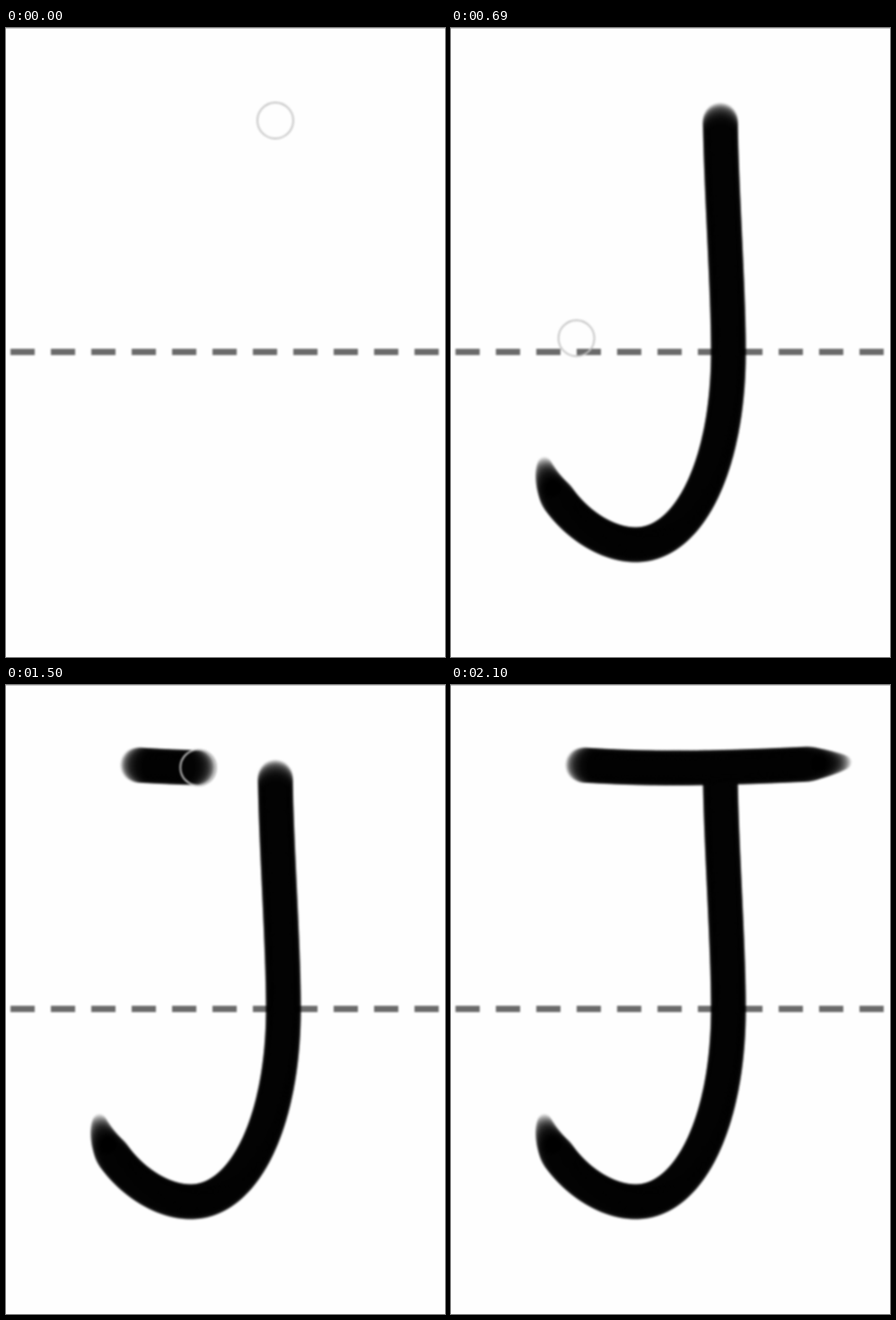
Animation, 489 px wide and 700 px high, one loop 7770 ms. Source, as an HTML page with a canvas:

```html
<!DOCTYPE html>
<html lang="en">
<head>
<meta charset="utf-8">
<title>Writing the letter J</title>
<style>
  html, body { margin: 0; width: 100%; height: 100%; overflow: hidden; background: #fefefe; }
  canvas { display: block; filter: blur(0.8px); }
  body::before { content: ""; position: absolute; z-index: 1; width: 100%; height: 1px; background: #ccc; }
</style>
</head>
<body>
<canvas id="stage" width="489" height="700"></canvas>
<script>
const ctx = document.getElementById('stage').getContext('2d');
const LOOP = 7770, TICK = 30, HIDE = 2100;
const RADIUS = 19.7, TAIL = 42, FLOW = 0.16;

const clamp = u => Math.max(0, Math.min(1, u));

function bezier([a, b, c, d], u) {
  const v = 1 - u;
  return [0, 1].map(k =>
    v * v * v * a[k] + 3 * v * v * u * b[k] + 3 * v * u * u * c[k] + u * u * u * d[k]);
}

// Sample chained cubic curves at one-pixel spacing.
function trace(pts) {
  const out = [pts[0]];
  let last = pts[0], travelled = 0;
  for (let i = 0; i + 3 < pts.length; i += 3) {
    for (let k = 1; k <= 600; k++) {
      const p = bezier(pts.slice(i, i + 4), k / 600);
      travelled += Math.hypot(p[0] - last[0], p[1] - last[1]);
      last = p;
      if (travelled >= out.length) out.push(p);
    }
  }
  return out;
}

// Strokes leave ink and gather speed; the other moves only carry the cursor.
const stroke = (from, to, power, pts) => {
  const path = trace(pts);
  const count = t => Math.round(path.length * clamp((t - from) / (to - from)) ** power);
  return { from, to, path, count, at: t => path[Math.max(0, count(t) - 1)] };
};
const travel = (from, to, pts) =>
  ({ from, to, at: t => bezier(pts, clamp((t - from) / (to - from))) });

const stem = stroke(0, 550, 1.65, [
  [300, 103], [301, 180], [309, 290],
  [309, 360], [309, 485], [266, 575],
  [206, 575], [156, 575], [106, 522], [104, 484]
]);
const hover = travel(550, 1320, [[104, 484], [140, 198], [379, 90], [145, 91]]);
const bar = stroke(1380, 1630, 2, [[147, 89], [240, 95], [320, 92], [439, 86]]);
const leave = travel(1630, HIDE, [[439, 86], [480, 84], [490, 60], [512, 60]]);
const moves = [stem, hover, bar, leave];

function disc([x, y], r, alpha) {
  ctx.fillStyle = `rgba(0,0,0,${alpha})`;
  ctx.beginPath();
  ctx.arc(x, y, r, 0, 2 * Math.PI);
  ctx.fill();
}

// Translucent dabs build up to a solid stroke with a tapering tail.
function ink({ path, count }, t) {
  for (let i = 0, n = count(t); i < n; i++) {
    const p = clamp((path.length - i) / TAIL);
    disc(path[i], RADIUS * (0.35 + 0.65 * p ** 0.75), FLOW * (0.25 + 0.75 * p));
  }
}

function drawPaper() {
  ctx.fillStyle = '#fefefe';
  ctx.fillRect(0, 0, 489, 700);
  ctx.fillStyle = '#6a6a6a';
  for (let x = 5; x < 489; x += 45) ctx.fillRect(x, 357, 27, 7);
}

function drawCursor(t) {
  const move = moves.filter(m => m.from <= t).pop();
  const [x, y] = move.at(t);
  if (t >= move.to) disc([x, y], 10, 0.06);
  ctx.strokeStyle = '#c4c4c4';
  ctx.lineWidth = 1.9;
  ctx.beginPath();
  ctx.arc(x, y, 20, 0, 2 * Math.PI);
  ctx.stroke();
}

function draw(t) {
  drawPaper();
  ink(stem, t);
  ink(bar, t);
  if (t < HIDE) drawCursor(t);
}

let shown = -1;
function loop() {
  const t = Math.floor((performance.now() % LOOP) / TICK) * TICK;
  if (t !== shown) draw(shown = t);
  requestAnimationFrame(loop);
}
loop();
</script>
</body>
</html>
```
